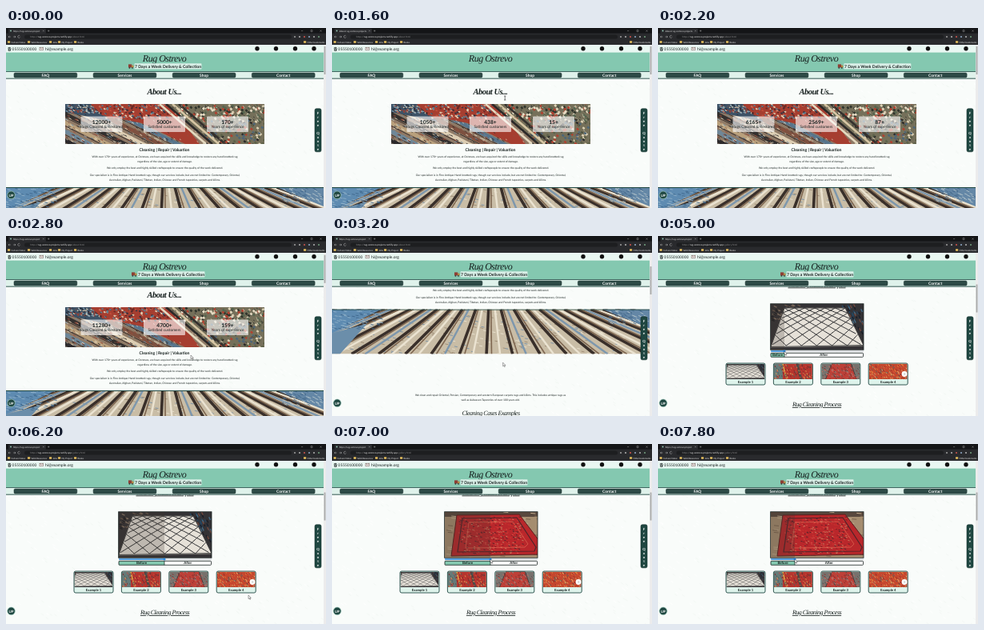
These frames come from a looping animation (400 px wide and 225 px high, 8000 ms). An HTML page:

```html
<!DOCTYPE html>
<html lang="en">
<head>
<meta charset="utf-8">
<title>Rug shop tour</title>
<style>
html, body { margin: 0; width: 100%; height: 100%; overflow: hidden; background: #f8fcfa; }
#stage { display: block; width: 100vw; height: 100vh; }
text { font-family: Lato, sans-serif; text-rendering: geometricPrecision; }
.script { font-family: "Liberation Serif", serif; font-style: italic; letter-spacing: -.5px; }
.b { font-weight: 700; }
</style>
</head>
<body>
<svg id="stage" viewBox="0 0 400 225" preserveAspectRatio="none"></svg>
<script>
const LOOP = 8000, STEP = 200, INK = '#17201f', PINE = '#1f4741', TEAL = '#84c8b0';
const stage = document.getElementById('stage');

let seed = 7;
const rnd = () => (seed = (seed * 16807) % 2147483647) / 2147483647;
const r1 = v => Math.round(v * 10) / 10;

// Markup helpers
const rect = (x, y, w, h, fill, more = '') =>
  `<rect x="${x}" y="${y}" width="${w}" height="${h}" fill="${fill}" ${more}/>`;
const dot = (x, y, r, fill, more = '') => `<circle cx="${x}" cy="${y}" r="${r}" fill="${fill}" ${more}/>`;
const path = (d, stroke, width = 1, fill = 'none', more = '') =>
  `<path d="${d}" fill="${fill}" stroke="${stroke}" stroke-width="${width}" ${more}/>`;
const area = (d, fill) => path(d, 'none', 0, fill);
const text = (s, x, y, size, fill = INK, cls = '', anchor = 'middle', more = '') =>
  `<text x="${x}" y="${y}" font-size="${size}" fill="${fill}" class="${cls}" text-anchor="${anchor}" ${more}>${s}</text>`;
const left = (s, x, y, size, fill, more) => text(s, x, y, size, fill, '', 'start', more);
const view = (x, y, w, h, body, box = `0 0 ${w} ${h}`) =>
  `<svg x="${x}" y="${y}" width="${w}" height="${h}" viewBox="${box}" preserveAspectRatio="none">${body}</svg>`;
const group = (id, body, more = '') => `<g id="${id}" ${more}>${body}</g>`;

// Short random stitches in one direction, one path per colour
function weave(x, y, w, h, count, colours, angle, len = 3, width = 1) {
  const c = Math.cos(angle) * len, s = Math.sin(angle) * len;
  return colours.map(col => {
    let d = '';
    for (let i = 0; i < count / colours.length; i++)
      d += `M${r1(x + rnd() * w)} ${r1(y + rnd() * h)}l${r1(c)} ${r1(s)}`;
    return path(d, col, width);
  }).join('');
}

function bannerRug() {
  let s = rect(0, 0, 250, 50, '#8f7a66');
  // Striped border running down to the right
  ['#d8c7a8', '#2c2a2c', '#6f8798', '#b9a07c', '#33302f', '#dccdb2', '#7d5140', '#58758c'].forEach((c, i) => {
    const y = 54 - i * 11;
    s += path(`M-5 ${y}L170 ${y + 88}`, c, 5);
    s += path(`M-5 ${y + 4}L170 ${y + 92}`, '#3a302c', 1);
  });
  s += weave(-3, 10, 170, 40, 300, ['#e4d8bf', '#34302f', '#6b879c', '#9a4a38'], .5, 3.4, .9);
  s += area('M0 0H34L58 22L0 10Z', '#3d5266')
    + weave(0, 0, 40, 11, 80, ['#d8cdb4', '#a33f31', '#222a36', '#7f9cae'], .4, 2.4, 1.3);
  s += area('M32 0H130L168 50H150L96 24L46 14Z', '#a63e30')
    + weave(42, 0, 86, 18, 150, ['#e2d2b4', '#2c3140', '#c44d3a', '#6a2a26', '#5f7d8f'], .5, 2.6, 1.7);
  // Floral field on the right
  s += area('M128 0H250V50H186Z', '#75705a')
    + weave(140, 0, 110, 20, 150, ['#dfd4b8', '#2f332b', '#b2402f', '#e6dcc4', '#56654f'], .9, 3, 2.6)
    + weave(172, 18, 78, 34, 150, ['#ded2b5', '#2a2a2a', '#b2402f', '#4d6678', '#5c6149'], .6, 3, 2.4);
  ['#e5dac0', '#2b2928', '#d7c6a4', '#34302d'].forEach((c, i) => {
    const x = 118 + i * 8;
    s += path(`M${x} 0L${x + 58} 50`, c, 2.6);
  });
  return s + weave(-3, -2, 254, 54, 300, ['#24262b', '#e4d9c0', '#8d5443'], .6, 2, .7);
}

function footRug() {
  let s = rect(0, 0, 397, 56, '#c9bda6');
  s += weave(-4, 0, 400, 56, 300, ['#e6decb', '#a08f78', '#8196a6'], .2, 4, 1);
  // Fringe fanning out from a point above
  const fan = x => `M${r1(x)} 0L${r1(198 + (x - 198) * 2.12)} 56`;
  for (let i = -1; i < 23; i++) {
    const x = 18 + i * 16 + rnd() * 3;
    s += path(fan(x), '#392f2a', 3.6) + path(fan(x + 3), '#7e6650', 1.6)
      + path(fan(x + 8), i % 3 ? '#ebe3d1' : '#7d97ad', 2.4);
  }
  s += area('M0 0H62L0 30Z', '#5e8bb1') + area('M338 0H397V24Z', '#6487a6') + area('M0 30L44 18L10 56H0Z', '#6b8eaa');
  s += weave(-4, 0, 64, 24, 90, ['#3f678c', '#8fb0c8'], .2, 4, .9) + weave(345, 0, 52, 18, 60, ['#44698c', '#b3c3ca'], .4, 4, .9);
  return s + rect(0, 0, 397, 1, PINE);
}

const LATTICE = (() => {
  let d = '';
  for (const dir of [1, -1]) for (let k = -5; k <= 11; k++) {
    let pen = 'M';
    for (let v = 0; v <= 1.001; v += .02) {
      const u = k / 6 + dir * v * 5 / 6;
      if (u < 0 || u > 1) continue;
      const q = v / (1.65 - .65 * v), l = 17 - 17 * q, r = 93 + 22 * q;
      d += `${pen}${r1(l + (r - l) * u)} ${r1(5 + 47 * q)}`;
      pen = 'L';
    }
  }
  return d;
})();

const whiteRug = () => rect(0, 0, 116, 57, '#343235')
  + weave(0, 0, 34, 20, 60, ['#665448', '#8a7766', '#1d1c20'], .4, 4, 1.3)
  + weave(84, 0, 32, 34, 80, ['#25445e', '#426b86', '#1a1d26', '#73483c'], 1.1, 4, 1.4)
  + path('M17 5H93L116 52L0 54Z', '#bbb6ac', .6, '#e6e1d8')
  + path(LATTICE, '#292a2d', 1)
  + path('M17 5H93L116 51.5L0 53.5Z', '#292a2d', .8);

const redRug = () => rect(0, 0, 116, 57, '#a58d70')
  + rect(0, 0, 116, 6, '#59483e')
  + weave(0, 0, 116, 57, 70, ['#c3ab8c', '#7d6650'], .1, 6)
  + path('M15 4L93 3L118 36V53L8 55Z', '#5a201f', 1, '#b9272b')
  + weave(17, 6, 80, 46, 360, ['#7a2024', '#db5147', '#47262c', '#d0342f', '#c88462'], .25, 2.2, .9)
  + path('M22 8L90 7L114 44L112 49L16 50Z', '#4e2429', 1.2)
  + path('M30 13L85 12L104 40L100 44L26 45Z', '#df6b54', .7);

const stripesRug = () => rect(0, 0, 48, 20, '#b5352e') + rect(0, 0, 11, 20, '#657a78')
  + path('M11 0L16 20', '#d8a743', 1.5) + path('M29 0L34 20', '#4b4642', 3)
  + weave(0, 0, 48, 20, 130, ['#d3433a', '#4f5d5b', '#d99551', '#80292a'], 1.2, 2);
const greyRug = () => rect(0, 0, 48, 20, '#77716c')
  + path('M13 0H37L44 20H5Z', '#493c3b', 1, '#bd4038')
  + weave(0, 0, 48, 20, 130, ['#8b2e2c', '#d6675a', '#8d8a84', '#504a49'], .9, 2);
const orangeRug = () => rect(0, 0, 48, 20, '#c5472e')
  + weave(0, 0, 48, 20, 170, ['#e28a3c', '#8d2e2a', '#4d6360', '#e25d3f', '#e0b06b'], .7, 2);

function thumb(i, art) {
  const x = 85 + i * 59.4;
  return rect(x, 159, 49, 27, '#def3eb', 'rx="2"') + view(x + .5, 159.5, 48, 19.5, art)
    + rect(x, 159, 49, 27, 'none', `rx="2" stroke="${PINE}" stroke-width=".9"`)
    + text('Example ' + (i + 1), x + 24.5, 184, 4.2, INK, 'b');
}

const STATS = [[119.5, 12000, 'Rugs Cleaned &amp; Restored'], [198, 5000, 'Satisfied customers'], [277, 170, 'Years of experience']];

function aboutPage() {
  const lines = [
    [162, 'With over 170+ years of experience, at Ostrevos, we have acquired the skills and knowledge to restore any hand knotted rug'],
    [168, 'regardless of the size, age or extent of damage.'],
    [176, 'We only employ the best and highly skilled craftspeople to ensure the quality of the work delivered.'],
    [185, 'Our specialism is in Fine Antique Hand-knotted rugs, though our services include, but are not limited to: Contemporary, Oriental,'],
    [191, 'Australian, Afghan, Pakistani, Tibetan, Indian, Chinese and French tapestries, carpets and kilims.']
  ];
  return text('About Us...', 198, 83, 10.5, INK, 'script b')
    + view(74, 95, 249, 50, bannerRug())
    + STATS.map(([x, , label], i) => rect(x - 26, 110.5, 52, 19.5, '#fff', 'opacity=".62" rx="1"')
      + text('', x, 120, 6.7, INK, 'b', 'middle', `id="n${i}"`) + text(label, x, 125.4, 4.8)).join('')
    + text('Cleaning | Repair | Valuation', 198, 154, 5.1, INK, 'b')
    + lines.map(([y, s]) => text(s, 198.5, y, 3.35)).join('')
    + view(0, 199, 397, 56, footRug());
}

function examples() {
  return text('We clean and repair Oriental, Persian, Contemporary and western European carpets rugs and kilims. This includes antique rugs as', 198, 39.3, 3.35)
    + text('well as Aubusson Tapestries of over 100 years old.', 198, 45.3, 3.35)
    + text('Cleaning Cases Examples', 198.5, 63.5, 8, INK, 'script', 'middle', 'text-decoration="underline"')
    + view(141, 85, 116, 57, group('rugA', whiteRug()) + group('rugB', redRug())
      + rect(0, 0, 0, 57, '#42372f', 'id="shade" opacity=".24"'))
    + rect(140.6, 84.7, 116.4, 57.6, 'none', `stroke="${INK}" stroke-width=".8"`)
    + rect(141, 143.2, 116, 1.5, '#e2e5e5', 'rx=".7" stroke="#aab" stroke-width=".2"')
    + rect(141, 143.2, 0, 1.5, '#2485dc', 'id="track" rx=".7"') + dot(0, 144, 1.6, '#2485dc', 'id="knob"')
    + rect(141, 146.3, 115.5, 5, '#fff') + rect(141, 146.3, 0, 5, TEAL, 'id="before"')
    + rect(141, 146.3, 115.5, 5, 'none', `rx=".8" stroke="${INK}" stroke-width=".8"`)
    + path('', INK, .7, 'none', 'id="split"')
    + text('Before', 0, 150.4, 4.4, INK, 'b', 'middle', 'id="lb"')
    + text('After', 0, 150.4, 4.4, INK, 'b', 'middle', 'id="la"')
    + [view(0, 0, 48, 19.5, whiteRug(), '12 0 104 57'), stripesRug(), greyRug(), orangeRug()].map((a, i) => thumb(i, a)).join('')
    + dot(308, 172.5, 3.4, '#fff') + path('M307.3 171l1.5 1.5l-1.5 1.5', '#777', .6)
    + text('Rug Cleaning Process', 198.5, 213, 8, INK, 'script', 'middle', 'text-decoration="underline"');
}

function header() {
  return rect(0, 21, 397, 10, '#e9f7f2') + rect(0, 30.6, 397, 24, TEAL) + rect(0, 54.5, 397, 8.6, '#dff2eb')
    + rect(0, 54.2, 397, .8, PINE) + rect(0, 62.7, 397, .9, PINE)
    + path('M2.3 25.2Q4.2 23.5 6.2 25.2M3 28.2h2.6l-.4-2.3h-1.8z', INK, .9)
    + left('05550100000', 7.6, 27.9, 4.8)
    + rect(42, 24.2, 4.6, 3.6, '#f6f1ee', 'stroke="#6b5550" stroke-width=".5"') + path('M42 24.2l2.3 2l2.3-2', '#6b5550', .5)
    + left('hi@example.org', 49, 27.9, 5)
    + [314, 337.5, 361.5, 385].map(x => dot(x, 25.8, 2.7, '#111')).join('')
    + text('Rug Ostrevo', 198, 41.6, 12, INK, 'script')
    + group('notice', rect(160.5, 44.3, 84, 7.2, '#e8f6f1', 'rx=".8" opacity=".85"')
      + rect(153, 45.4, 4.2, 4, '#8e3f35') + rect(157.2, 46.6, 2.2, 2.8, '#b98237')
      + dot(154.4, 49.8, .9, '#333') + dot(158, 49.8, .9, '#333')
      + text('7 Days a Week Delivery &amp; Collection', 202.6, 49.8, 5.1, INK, 'b'))
    + ['FAQ', 'Services', 'Shop', 'Contact'].map((s, i) => {
      const x = 10 + i * 99.1;
      return rect(x, 56, 78.8, 6, '#2d4a46', 'rx="1.6" stroke="#1b312e" stroke-width=".5"')
        + text(s, x + 39.4, 60.7, 4.9, '#fff', 'b');
    }).join('');
}

function floating() {
  let s = rect(386, 100.8, 8, 54, PINE, 'rx="2" stroke="#14302c" stroke-width=".6"');
  [...'Free Quote'].forEach((c, i) => s += text(c, 390, 108.4 + i * 5, 4.3, '#fff', 'b'));
  return s + dot(6.5, 208.8, 4.8, PINE, 'stroke="#9cc7ba" stroke-width=".7"') + text('UP', 6.5, 210.5, 4.4, '#fff', 'b')
    + rect(397, 21, 3, 204, '#ececec') + rect(397.6, 0, 1.8, 35, '#a9abab', 'id="thumb"');
}

function chrome() {
  const marks = [[2, 'Culture Notes'], [27, 'Web Resources'], [54, 'Jobs'], [65, 'My Project'], [85, 'Books'], [372, 'Other bookmarks']];
  return rect(0, 0, 400, 7, '#141517') + rect(0, 6.6, 400, 14.4, '#292a2d')
    + rect(3, .8, 47, 6.2, '#292a2d', 'rx="1.2"') + dot(6, 3.6, 1, '#8ebfae')
    + left('', 9, 4.7, 2.9, '#ddd', 'id="tab"')
    + path('M46 2.7l1.7 1.7m0-1.7l-1.7 1.7M52 3.6h2.4m-1.2-1.2v2.4', '#bbb', .4)
    + path('M369 3.6h2.2M381 2.6h2v2h-2zM392.5 2.6l2 2m0-2l-2 2', '#bbb', .4)
    + path('M6 11h-3l1.2-1.2m-1.2 1.2l1.2 1.2M9 11h3l-1.2-1.2m1.2 1.2l-1.2 1.2M17.4 9.9a1.5 1.5 0 1 0 .2 1.6', '#bbb', .5)
    + rect(23, 8.4, 334, 5.2, '#1d1e20', 'rx="2.6"')
    + left('<tspan fill="#888">https://</tspan>rug-ostrevo.projects.netlify.app<tspan fill="#888" id="url"></tspan>', 30, 12.2, 3.1, '#eee')
    + ['#999', '#aaa', '#c9524b', '#8ba4c2', '#aaa', '#6e9a7b'].map((c, i) => dot(361 + i * 6, 11, 1.1, c)).join('')
    + marks.map(([x, s]) => rect(x, 16.2, 3.2, 2.5, '#e3bd5c', 'rx=".4"') + left(s, x + 4.4, 18.6, 2.9, '#ddd')).join('');
}

stage.innerHTML = rect(0, 0, 400, 225, '#f9fcfa')
  + weave(0, 63, 397, 162, 500, ['#f1f7f3', '#fff'], .6, 4, .8)
  + group('page', aboutPage() + group('cases', examples(), 'transform="translate(0 268)"'))
  + header() + floating() + chrome()
  + group('cursor', path('M0 0V4.6L1.1 3.6L1.9 5.4L2.7 5L1.9 3.3H3.3Z', '#222', .4, '#fff', 'id="arrow"')
    + path('M0 0h2.4M1.2 0v5M0 5h2.4', '#222', .6, 'none', 'id="beam"'));

const $ = id => document.getElementById(id);
const set = (id, name, v) => $(id).setAttribute(name, v);
const show = (id, on) => set(id, 'display', on ? 'inline' : 'none');

// Linear track through [time, value] pairs
function at(keys, t) {
  const i = keys.findIndex(k => k[0] > t);
  if (i === 0) return keys[0][1];
  if (i < 0) return keys[keys.length - 1][1];
  const [t0, a] = keys[i - 1], [t1, b] = keys[i];
  return a + (b - a) * (t - t0) / (t1 - t0);
}

const SCROLL = [[2600, 0], [2800, 6], [3000, 45], [3400, 170], [3600, 222], [3800, 240], [4000, 258], [4200, 268]];
const SLIDE = [[4400, 198.5], [4800, 169], [5000, 158], [5200, 144], [5400, 178], [5600, 225], [5800, 254], [6000, 198],
  [7000, 198], [7200, 236], [7400, 256], [7600, 215], [7800, 171]];
const MOVE_X = [[400, -9], [1000, 16], [1200, 16], [1600, 215], [2800, 231], [3400, 205], [3800, 198], [4400, 198],
  [6000, 198], [6200, 303], [6600, 172], [6800, 170], [7000, 198]];
const MOVE_Y = [[400, 40], [1000, 11], [1200, 11], [1600, 85], [2800, 149], [3800, 172], [4200, 144], [6000, 144],
  [6200, 189], [6600, 172], [6800, 171], [7000, 144]];

function draw(ms) {
  const t = Math.floor(ms % LOOP / STEP) * STEP;
  const scroll = at(SCROLL, t), x = at(SLIDE, t), fresh = t >= 1200;

  set('page', 'transform', `translate(0 ${-scroll})`);
  set('thumb', 'y', 23 + scroll * .14);

  const p = fresh ? Math.min(1, Math.max(0, .0875 + (t - 1600) / 1200 * .8525)) : 1;
  STATS.forEach(([, n], i) => $('n' + i).textContent = Math.round((i === 2 ? n - .5 : n) * p) + '+');

  const q = fresh ? Math.min(1, Math.max(0, (t - 1700) / 1470)) : 1;
  set('notice', 'transform', `translate(${250 * (1 - q) ** 3} 0)`);

  $('tab').textContent = fresh && t < 2600 ? 'About rug-ostrevo.projects' : 'https://rug-ostrevo.project';
  $('url').textContent = t < 3800 ? '/about.html' : '/gallery.html';

  const red = t >= 6800;
  show('rugA', !red);
  show('rugB', red);
  for (const id of ['shade', 'track', 'before']) set(id, 'width', x - 141);
  set('knob', 'cx', x);
  set('split', 'd', `M${x} 146.3v5`);
  set('lb', 'x', (141 + x) / 2);
  set('la', 'x', (256.5 + x) / 2);

  const drag = (t > 4400 && t <= 6000) || t > 7000, overText = t >= 1600 && t < 2600;
  set('cursor', 'transform', `translate(${drag ? x : at(MOVE_X, t)} ${at(MOVE_Y, t)})`);
  show('arrow', !overText);
  show('beam', overText);
}

const start = performance.now();
(function tick() {
  draw(performance.now() - start);
  requestAnimationFrame(tick);
})();
</script>
</body>
</html>
```
